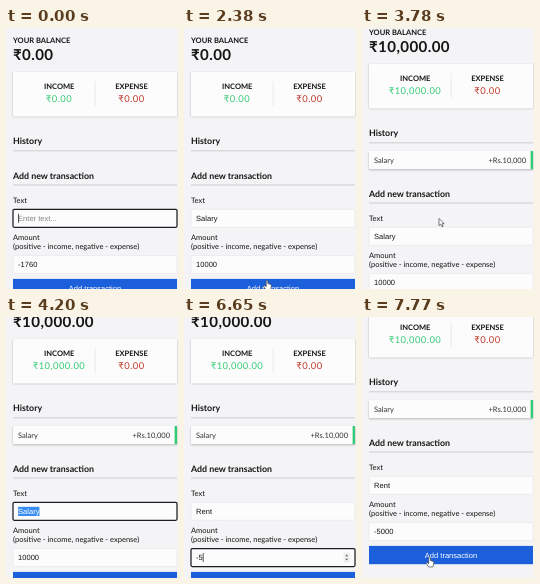
An HTML page with a canvas for the animation above (8 s loop, 172 by 261 pixels).

```html
<!DOCTYPE html>
<html lang="en">
<head>
<meta charset="utf-8">
<title>Expense tracker</title>
<style>
  html, body { margin: 0; width: 100%; height: 100%; overflow: hidden; background: #f4f3f5; }
  canvas { display: block; width: 172px; height: 261px; }
</style>
</head>
<body>
<canvas id="stage"></canvas>
<script>
const W = 172, H = 261, LOOP = 8000, TICK = 70;
const LEFT = 7, RIGHT = 171, EM = 7.54;
const LATO = 'Lato, "Open Sans", sans-serif';
const ARIAL = '"Liberation Sans", Arial, sans-serif';
const INK = '#151515', GREEN = '#35cb75', RED = '#c0392b', BLUE = '#1b5fdb';

const canvas = document.getElementById('stage');
const ctx = canvas.getContext('2d');
const dpr = window.devicePixelRatio || 1;
canvas.width = Math.round(W * dpr);
canvas.height = Math.round(H * dpr);

// [time, value] keys; the latest one reached holds
const TEXT = [[0, ''], [210, 'S'], [350, 'Sa'], [420, 'Sal'], [630, 'Salar'], [700, 'Salary'],
  [4550, 'R'], [4620, 'Re'], [4760, 'Ren'], [4900, 'Rent']];
const AMOUNT = [[0, '-1760'], [1190, '1'], [1400, '100'], [1470, '1000'], [1680, '10000'],
  [6300, '-'], [6650, '-5'], [6860, '-50'], [6930, '-500'], [7000, '-5000']];
const FOCUS = [[0, 'text'], [910, 'amount'], [2380, ''], [4200, 'text'], [5460, 'amount'], [7770, '']];
const SELECTED = [[0, false], [910, true], [1190, false], [4200, true], [4550, false],
  [5460, true], [6300, false]];
const SCROLL = [[0, 0], [3780, 8], [3850, 17], [3990, 22], [7280, 36], [7350, 48]];
const ADDED = 2870;

// pointer paths: start, end of motion, end of visibility, from, to, shape
const POINTER = [
  [1960, 2240, 2870, 32, 219, 83, 252.5, 'hand'],
  [2870, 2870, 3150, 83, 252.5, 83, 252.5, 'hand'],
  [3150, 3360, 3990, 83, 252.5, 77, 190.5, 'arrow'],
  [3990, 4130, 4200, 77, 190.5, 24, 194, 'arrow'],
  [7490, 7770, 8000, 40, 205, 67.5, 240.5, 'hand']
];

function keyAt(keys, t) {
  let found = keys[0];
  for (const key of keys) if (key[0] <= t) found = key;
  return found;
}
const valueAt = (keys, t) => keyAt(keys, t)[1];

function label(str, x, y, { size = EM, weight = 400, color = INK, family = LATO, align = 'left', spacing = 0 } = {}) {
  ctx.font = `${weight} ${size}px ${family}`;
  ctx.letterSpacing = spacing + 'px';
  ctx.textAlign = align;
  ctx.fillStyle = color;
  ctx.fillText(str, x, y);
}

function rect(x, y, w, h, color) {
  ctx.fillStyle = color;
  ctx.fillRect(x, y, w, h);
}

function card(y, h) {
  ctx.save();
  ctx.shadowColor = 'rgba(0,0,0,.3)';
  ctx.shadowBlur = 1.8 * dpr;
  ctx.shadowOffsetY = 0.5 * dpr;
  rect(LEFT, y, RIGHT - LEFT, h, '#fdfcfd');
  ctx.restore();
}

function heading(str, y) {
  label(str, LEFT, y, { size: 8.82, weight: 700 });
  rect(LEFT, y + 6.2, RIGHT - LEFT, 0.6, '#b5b5b5');
}

function spinner(cy) {
  rect(159.5, cy - 5, 6.6, 10, '#efeff0');
  ctx.fillStyle = '#555';
  for (const dir of [-1, 1]) {
    ctx.beginPath();
    ctx.moveTo(161.3, cy + dir * 1.2);
    ctx.lineTo(164.1, cy + dir * 1.2);
    ctx.lineTo(162.7, cy + dir * 3);
    ctx.fill();
  }
}

function field(y, value, { hint = '', focused, selected, caret, steps }) {
  const x = 12.1, base = y + 11.4;
  ctx.beginPath();
  ctx.roundRect(LEFT, y, RIGHT - LEFT, 18, focused ? 1.2 : 0.8);
  ctx.fillStyle = '#fdfcfd';
  ctx.fill();
  ctx.lineWidth = focused ? 1.25 : 0.5;
  ctx.strokeStyle = focused ? '#1c1d22' : '#e2e1e3';
  ctx.stroke();

  ctx.font = `400 ${EM}px ${ARIAL}`;
  ctx.letterSpacing = '0px';
  const width = ctx.measureText(value).width;
  const marked = focused && selected;
  if (marked) rect(x, y + 4.5, width, 9.2, '#3a8df0');
  const color = marked ? '#ffffff' : value ? INK : '#858585';
  label(value || hint, x, base, { family: ARIAL, color });
  if (focused && !selected && caret) rect(x + width, y + 4.5, 0.7, 9, '#111');
  if (focused && steps) spinner(y + 9);
}

function outline(points) {
  ctx.beginPath();
  points.forEach(([x, y]) => ctx.lineTo(x, y));
  ctx.closePath();
  ctx.fillStyle = '#fff';
  ctx.strokeStyle = '#444';
  ctx.lineWidth = 0.7;
  ctx.lineJoin = 'round';
  ctx.fill();
  ctx.stroke();
}

const SHAPES = {
  arrow: [[0, 0], [0, 7.2], [1.7, 5.7], [2.9, 8.3], [4.1, 7.8], [3, 5.2], [5.2, 5.1]],
  hand: [[-0.8, 0.4], [0, -0.2], [0.8, 0.4], [0.9, 3.1], [3.8, 3.9], [4.4, 4.8], [3.9, 7.6],
    [3.4, 9.4], [-0.9, 9.4], [-3.4, 5.9], [-2.7, 5], [-0.8, 6.1]]
};

function pointer(t) {
  const path = POINTER.find(([start, , gone]) => t >= start && t < gone);
  if (!path) return;
  const [start, end, , x0, y0, x1, y1, shape] = path;
  const u = Math.min(1, (t - start + TICK) / (end - start + TICK));
  const k = u * (2 - u);
  const kind = shape === 'hand' && u < 0.75 ? 'arrow' : shape;
  ctx.save();
  ctx.translate(x0 + (x1 - x0) * k, y0 + (y1 - y0) * k);
  outline(SHAPES[kind]);
  ctx.restore();
}

function summary(total) {
  const money = { size: 9.42, align: 'center', spacing: 0.45 };
  const title = { weight: 700, align: 'center' };
  label('YOUR BALANCE', LEFT, 15, { weight: 700 });
  label(total, LEFT, 31.9, { size: 15.07, weight: 700, spacing: 0.4 });
  card(44, 44.6);
  rect(88.8, 53.2, 0.6, 25, '#dedede');
  label('INCOME', 53.2, 61, title);
  label('EXPENSE', 125.5, 61, title);
  label(total, 53, 74.2, { ...money, color: GREEN });
  label('₹0.00', 125.5, 74.2, { ...money, color: RED });
}

function item() {
  card(131, 18.2);
  rect(RIGHT - 2.4, 131, 2.4, 18.2, GREEN);
  label('Salary', 12, 142.9, { color: '#333' });
  label('+Rs.10,000', 164.1, 142.9, { color: '#333', align: 'right' });
}

function form(t) {
  const focus = valueAt(FOCUS, t), selected = valueAt(SELECTED, t);
  const lastKey = Math.max(...[TEXT, AMOUNT, FOCUS].map(keys => keyAt(keys, t)[0]));
  const caret = (t - lastKey) % 1060 < 530;
  heading('Add new transaction', 150.5);
  label('Text', LEFT, 174.6);
  field(181.3, valueAt(TEXT, t), { hint: 'Enter text...', focused: focus === 'text', selected, caret });
  label('Amount', LEFT, 211.8);
  label('(positive - income, negative - expense)', LEFT, 220.7);
  field(227.5, valueAt(AMOUNT, t), { focused: focus === 'amount', selected, caret, steps: true });
  rect(LEFT, 250.9, RIGHT - LEFT, 18.3, BLUE);
  label('Add transaction', 89, 262.9, { family: ARIAL, color: '#fff', align: 'center' });
}

function draw(t) {
  const added = t >= ADDED;
  ctx.setTransform(dpr, 0, 0, dpr, 0, 0);
  ctx.textRendering = 'geometricPrecision';
  rect(0, 0, W, H, '#f4f3f5');
  ctx.save();
  ctx.translate(0, -valueAt(SCROLL, t));
  summary(added ? '₹10,000.00' : '₹0.00');
  heading('History', 116.4);
  if (added) {
    item();
    ctx.translate(0, 26);
  }
  form(t);
  ctx.restore();
  pointer(t);
}

const begin = performance.now();
function frame() {
  const t = (performance.now() - begin) % LOOP;
  draw(Math.floor(t / TICK) * TICK);
  requestAnimationFrame(frame);
}
frame();
</script>
</body>
</html>
```
